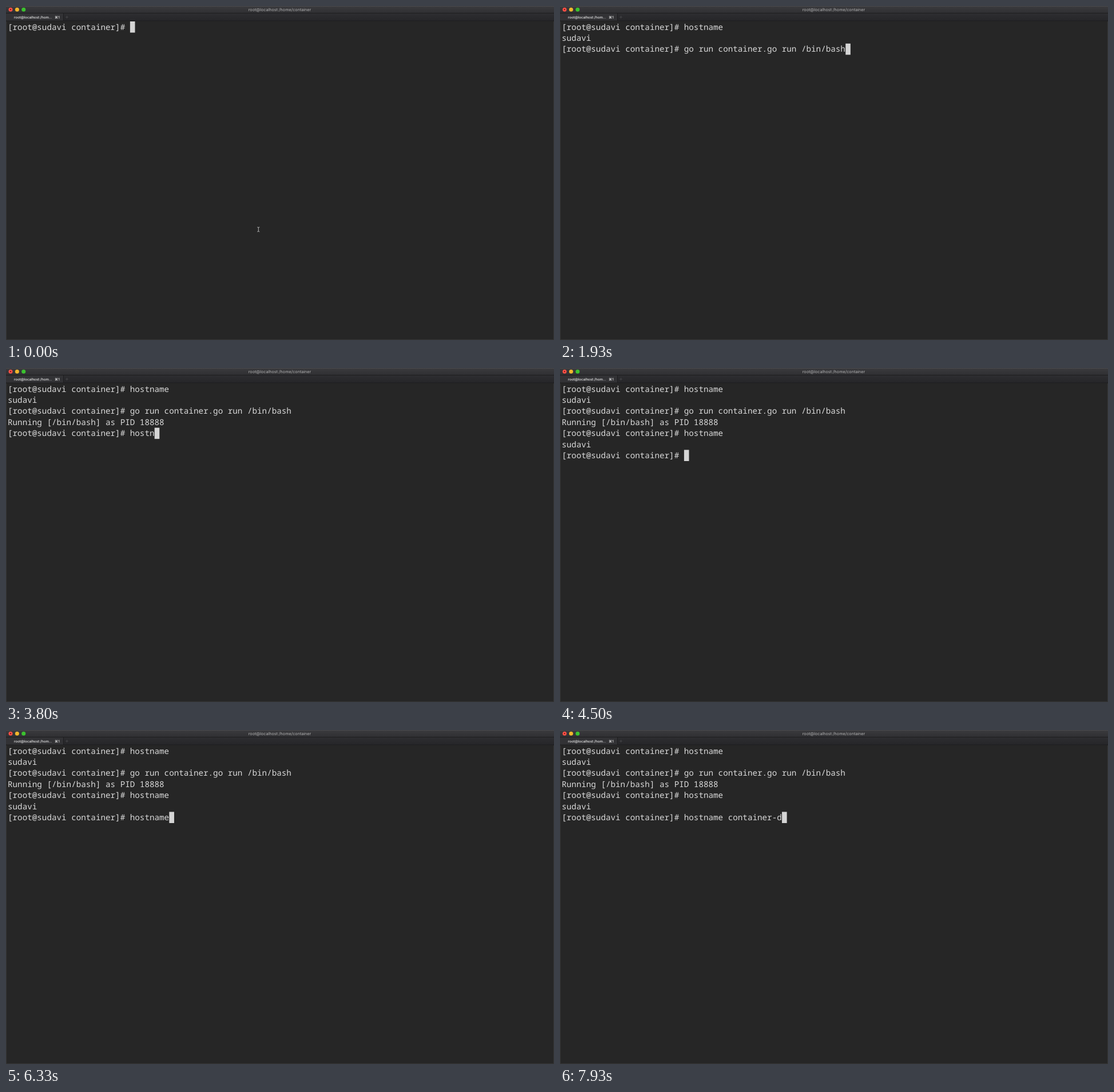
An HTML page that plays this animation: 958x585 px, repeating every 8000 ms.

```html
<!DOCTYPE html>
<html lang="en">
<head>
<meta charset="utf-8">
<title>Terminal</title>
<style>
  html, body { margin: 0; width: 100%; height: 100%; overflow: hidden; background: #262626; }
  svg { display: block; width: 958px; height: 585px; }
  text { white-space: pre; text-rendering: geometricPrecision; }
  .ui { font-family: Inter, Roboto, sans-serif; }
  #screen text { font: 14.26px "Noto Sans Mono", "DejaVu Sans Mono", monospace; fill: #dadada; }
</style>
</head>
<body>
<svg viewBox="0 0 958 585" xmlns="http://www.w3.org/2000/svg">
  <defs>
    <linearGradient id="bar" x2="0" y2="1">
      <stop offset="0" stop-color="#3b3b3e"/>
      <stop offset="1" stop-color="#2f2f32"/>
    </linearGradient>
    <linearGradient id="tabs" x2="0" y2="1">
      <stop offset="0" stop-color="#2d2d30"/>
      <stop offset="1" stop-color="#262629"/>
    </linearGradient>
  </defs>
  <rect width="958" height="585" fill="#262626"/>
  <rect width="958" height="13" fill="url(#bar)"/>
  <rect width="958" height="1" fill="#4a4a4d"/>
  <rect y="13" width="958" height="13" fill="url(#tabs)"/>
  <rect y="13" width="100" height="13" fill="#323235"/>
  <path d="M0 12.5H958M0 26H958M100.5 13V26" stroke="#1d1d1f" fill="none"/>
  <path d="M.5 27V584.5H957.5V27" stroke="#363636" fill="none"/>
  <circle cx="8" cy="6.2" r="3.5" fill="#fc5047"/>
  <circle cx="8" cy="6.2" r="1.1" fill="#7d1712"/>
  <circle cx="19.4" cy="6.2" r="3.5" fill="#f2b62d"/>
  <circle cx="30.8" cy="6.2" r="3.5" fill="#3bc22f"/>
  <g class="ui">
    <text x="478.5" y="9" font-size="7.2" text-anchor="middle" fill="#b4b4b5">root@localhost:/home/container</text>
    <text x="14" y="21.6" font-size="6.1" font-weight="500" fill="#ededed">root@localhost:/hom...</text>
    <text x="85" y="21.6" font-size="6.2" font-weight="500" fill="#ededed" style="font-family:Inter,'DejaVu Sans',sans-serif">⌘1</text>
  </g>
  <path d="M104 19.5H109M106.5 17V22" stroke="#48484b" stroke-width=".8"/>
  <g id="screen"><rect id="caret" width="8.6" height="19.6" fill="#d5d5d5"/></g>
  <path id="pointer" d="M439.3 387.3Q441.3 387.3 441.3 388.5Q441.3 387.3 443.3 387.3M441.3 388V394.5M439.3 395.3Q441.3 395.3 441.3 394Q441.3 395.3 443.3 395.3" fill="none" stroke="#c4c4c4" stroke-width=".9"/>
</svg>
<script>
  const LOOP = 8000, LEFT = 3, TOP = 27, CELL = 8.556, ROW = 19.4;
  const HOST = "sudavi", PROMPT = `[root@${HOST} container]# `;

  // Each row appears at "at"; its typed characters arrive at the times in "keys".
  const rows = [
    { at: 0, text: PROMPT, typed: "hostname", keys: [30, 370, 500, 670, 830, 930, 1030, 1100] },
    { at: 1300, text: HOST },
    { at: 1300, text: PROMPT, typed: "go run container.go run /bin/bash", pasteAt: 1930 },
    { at: 2300, text: "", typed: "Running [/bin/bash] as PID 18888", pasteAt: 2530 },
    { at: 2600, text: PROMPT, typed: "hostname", keys: [3100, 3330, 3400, 3600, 3800, 3830, 3970, 4100] },
    { at: 4500, text: HOST },
    { at: 4500, text: PROMPT, typed: "hostname container-d",
      keys: [5430, 5630, 5700, 5870, 6000, 6100, 6200, 6300, 6430,
             6570, 6670, 6800, 7030, 7100, 7270, 7400, 7500, 7700, 7830, 7930] }
  ];

  const byId = id => document.getElementById(id);
  const screen = byId("screen"), caret = byId("caret"), pointer = byId("pointer");
  const rowTop = i => TOP + i * ROW;

  const lines = rows.map((_, i) => {
    const line = document.createElementNS("http://www.w3.org/2000/svg", "text");
    line.setAttribute("x", LEFT);
    line.setAttribute("y", rowTop(i) + 14.6);
    screen.append(line);
    return line;
  });

  function contentAt(row, t) {
    if (t < row.at) return "";
    const { text, typed = "", keys, pasteAt } = row;
    const count = keys ? keys.filter(k => k <= t).length : t >= pasteAt ? typed.length : 0;
    return text + typed.slice(0, count);
  }

  function render(t) {
    let last = 0;
    rows.forEach((row, i) => {
      const content = contentAt(row, t);
      if (lines[i].textContent !== content) lines[i].textContent = content;
      if (t >= row.at) last = i;
    });
    caret.setAttribute("x", LEFT + lines[last].textContent.length * CELL);
    caret.setAttribute("y", rowTop(last));
    pointer.style.visibility = t < 30 ? "visible" : "hidden";
  }

  const start = performance.now();
  function tick() {
    render((performance.now() - start) % LOOP);
    requestAnimationFrame(tick);
  }
  tick();
</script>
</body>
</html>
```
